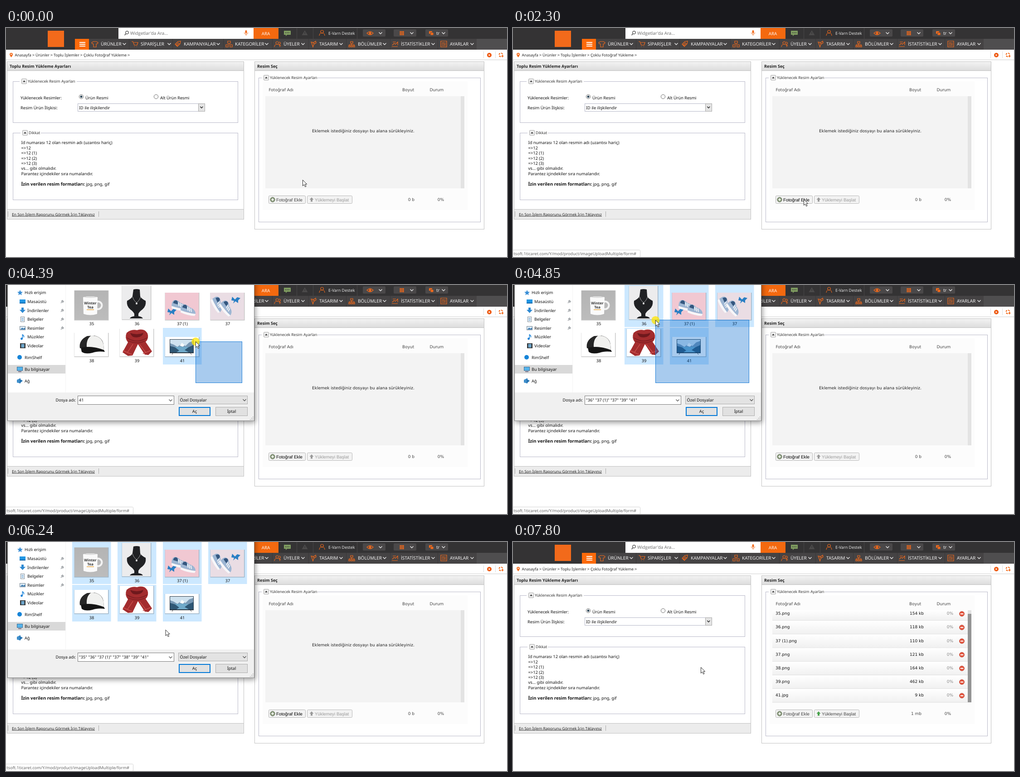
Animation, 1105 px wide and 507 px high, one loop 8.17 s. Source, as an HTML page:

```html
<!DOCTYPE html>
<html lang="tr">
<head>
<meta charset="utf-8">
<title>Çoklu Fotoğraf Yükleme</title>
<style>
html, body { margin: 0; width: 100%; height: 100%; overflow: hidden; background: #fff; }
svg { display: block; }
text { font-family: "Noto Sans", "Open Sans", sans-serif; text-rendering: geometricPrecision; white-space: pre; }
.menu { font-family: "Open Sans", sans-serif; }
.wide { font-family: "DejaVu Sans", sans-serif; }
.button { font-family: "Liberation Sans", sans-serif; }
.bold { font-weight: bold; }
.mid { text-anchor: middle; }
.end { text-anchor: end; }
.icon { fill: none; stroke: #f26a1b; stroke-width: 1.2; }
#dialogFrame { filter: drop-shadow(2px 4px 6px rgba(0,0,0,.4)); }
</style>
</head>
<body>
<svg id="stage" width="1105" height="507" viewBox="0 0 1105 507"></svg>
<script>
const LOOP = 8170;
const ORANGE = '#f26a1b';
const rect = (x, y, w, h, fill, more = '') => `<rect x="${x}" y="${y}" width="${w}" height="${h}" fill="${fill}" ${more}/>`;
const box = (x, y, w, h, fill, stroke, more = '') => rect(x + .5, y + .5, w - 1, h - 1, fill, `stroke="${stroke}" ${more}`);
const circle = (x, y, r, fill, more = '') => `<circle cx="${x}" cy="${y}" r="${r}" fill="${fill}" ${more}/>`;
const path = (d, fill, more = '') => `<path d="${d}" fill="${fill}" ${more}/>`;
const line = (d, stroke, width = 1) => path(d, 'none', `stroke="${stroke}" stroke-width="${width}"`);
const icon = d => `<path class="icon" d="${d}"/>`;
const text = (x, y, s, size = 9.2, fill = '#111', cls = '', more = '') =>
  `<text x="${x}" y="${y}" font-size="${size}" fill="${fill}" class="${cls}" ${more}>${s}</text>`;
const group = (id, body, more = '') => `<g id="${id}" ${more}>${body}</g>`;
const chevron = (x, y, color = '#eee') => line(`M${x - 3.5} ${y - 2}l3.5 3.5 3.5 -3.5`, color, 1.3);
const each = (list, fn) => list.map(fn).join('');

const menu = [
  [209, 261, 'ÜRÜNLER', 'M189 32l4 -2h6l4 2 -1 3h-3v7h-6v-7h-3z'],
  [297, 360, 'SİPARİŞLER', 'M277 30h3l3 8h6l2 -6h-9M283 41h1M288 41h1'],
  [392, 468, 'KAMPANYALAR', 'M373 36l6 -6 6 -1 -1 6 -6 6zM375 36l4 4M377 34l4 4M379 32l4 4'],
  [505, 575, 'KATEGORİLER', 'M489 29h6v5h-6zM485 37h5v5h-5zM494 37h5v5h-5zM492 34v3'],
  [612, 655, 'ÜYELER', 'M592 42c0 -8 12 -8 12 0M598 30a3 3 0 1 0 .1 0M602 31c4 0 4 5 1 5l3 4'],
  [691, 739, 'TASARIM', 'M673 31l6 1 4 -3 1 4 -5 3 -2 6 -2 -6zM676 33l5 2'],
  [776, 835, 'BÖLÜMLER', 'M760 30h5v4h-5zM756 39h3v3h-3zM761 39h3v3h-3zM766 39h3v3h-3zM757 39v-2h11v2M762 34v4'],
  [871, 942, 'İSTATİSTİKLER', 'M851 41h13M852 38l4 -4 3 2 5 -5v7M853 31h7'],
  [979, 1028, 'AYARLAR', 'M959 29h13v13h-13zM961 33h9M961 36h9M961 39h9M964 32v2M968 35v2']
];

function header() {
  return rect(0, 0, 1105, 48, '#343334') + rect(152, 24, 886, 24, '#454344') + rect(1038, 24, 67, 24, '#4f4e4f')
    + rect(92, 6, 36, 36, ORANGE)
    + rect(248, 0, 298, 24, '#fff') + circle(267, 10, 3.2, 'none', 'stroke="#444" stroke-width="1.2"') + line('M264.6 12.5l-3 3.5', '#444', 1.4)
    + text(274, 15, "Widgetlar'da Ara...", 9.8, '#666', 'menu')
    + rect(527.5, 5, 4, 7, ORANGE, 'rx="2"') + line('M525.5 10c0 5 8 5 8 0M529.5 14v3', ORANGE)
    + rect(546, 0, 55, 24, '#f4690f') + text(573, 15.5, 'ARA', 9.8, '#fff', 'menu mid')
    + path('M613 6h15v9h-8l-3 3v-3h-4z', '#7f9c60') + each([617, 620.5, 624], x => circle(x, 10.5, 1, '#343334'))
    + line('M641.5 0v24M677.5 0v24M774.5 0v24', '#484647') + path('M659 5l6.5 11h-13z', '#4b4a4a') + rect(658.5, 9, 1.2, 4, '#343334')
    + icon('M691 17c0 -8 12 -8 12 0M697 5a3.3 3.3 0 1 0 .1 0') + text(711, 15, 'E-Varn Destek', 9, '#f2f2f2', 'menu')
    + each([787, 855, 925], x => rect(x, 3, 50, 16, '#4a4849', 'rx="2"')) + each([826, 895, 965], x => chevron(x, 11.5))
    + icon('M796 11.5q7 -7 14 0q-7 7 -14 0z') + circle(803, 11.5, 2.5, ORANGE)
    + each([0, 1, 2], i => each([0, 1, 2], j => rect(868.5 + 3.3 * i, 7 + 3.2 * j, 2.6, 2.6, ORANGE)))
    + rect(933, 7, 7, 6, ORANGE, 'rx="1"') + rect(936, 10, 7, 6, ORANGE, 'rx="1" stroke="#4a4849"') + text(949, 15, 'tr', 9.8, '#fff', 'menu')
    + rect(152, 24, 31, 24, '#fb6a0a') + each([31, 35, 39], y => rect(162, y, 13, 2, '#fff'))
    + each(menu, ([x, arrow, label, d]) => icon(d) + text(x, 39.3, label, 10.1, '#fff', 'menu') + chevron(arrow, 35.5))
    + each([271, 367, 479, 587, 667, 750, 847, 952], x => rect(x, 24, 1, 24, '#3a3839'));
}

function breadcrumb() {
  return rect(0, 70, 1105, 1, '#cfcfcf')
    + path('M11.5 65c-6 -7 -3 -10 0 -10s6 3 0 10z', ORANGE) + circle(11.5, 58.3, 1.3, '#fff')
    + text(19.5, 62.8, 'Anasayfa &gt; Ürünler &gt; Toplu İşlemler &gt; Çoklu Fotoğraf Yükleme &gt;', 8.5, '#222')
    + line('M1053.5 52v15M1079.5 52v15', '#ddd') + circle(1066, 60, 5, '#ee5a12') + path('M1064.7 57.7v4.6l3.5 -2.3z', '#fff')
    + circle(1091.5, 59.5, 4, 'none', `stroke="${ORANGE}" stroke-width="2.2" stroke-dasharray="4 2.28"`) + line('M1095 60v5M1092.5 62.5h5', ORANGE, 1.4);
}

const panel = (x, w, h, title) => box(x, 74, w, h, '#fff', '#c2c2c2')
  + box(x, 74, w, 21, 'url(#titleShade)', '#c2c2c2') + text(x + 6, 88, title, 9.1, '#222', 'bold');

const fieldset = (x, y, w, h, legendX, legendW, title) => box(x, y, w, h, 'none', '#b9b9c9')
  + rect(legendX - 4, y - 2, legendW, 5, '#fff')
  + box(legendX, y - 6, 12, 12, '#eee', '#aaa', 'rx="1.5"') + path(`M${legendX + 3} ${y + 1.5}l3 -3.5 3 3.5z`, '#333')
  + text(legendX + 14, y + 3.3, title, 8.55, '#333');

const radio = (x, on) => circle(x, 152, 4.7, '#f6f6f6', 'stroke="#777"') + (on ? circle(x, 152, 2.5, '#334b5c') : '');

function settingsPanel() {
  const notes = ['Id numarası 12 olan resmin adı (uzantısı hariç)', '=&gt;12', '=&gt;12 (1)', '=&gt;12 (2)', '=&gt;12 (3)', 'vs... gibi olmalıdır.', 'Parantez içindekiler sıra numalarıdır.'];
  return panel(2, 523, 350, 'Toplu Resim Yükleme Ayarları')
    + fieldset(15, 118, 497, 92, 34, 126, 'Yüklenecek Resim Ayarları') + fieldset(15, 232, 497, 149, 36, 45, 'Dikkat')
    + text(32, 157.5, 'Yüklenecek Resimler:') + text(32, 179.7, 'Resim Ürün İlişkisi:')
    + radio(166, true) + text(175, 157.5, 'Ürün Resmi') + radio(331, false) + text(340, 157.5, 'Alt Ürün Resmi')
    + box(158, 167, 281, 18, '#fff', '#b5b8c8') + text(161, 179.5, 'ID ile ilişkilendir')
    + box(424, 167, 15, 18, '#e4e4e4', '#aaa') + line('M428.3 174l3 3 3 -3', '#333', 1.6)
    + each(notes, (s, i) => text(33.5, 257.3 + 11.4 * i, s, 9.3))
    + text(33.5, 348.5, '<tspan class="bold" font-size="9.8">İzin verilen resim formatları:</tspan> jpg, png, gif', 9.3)
    + box(2, 401, 523, 23, '#ececec', '#c2c2c2') + line('M4.5 406v12M204.5 406v12', '#aaa')
    + text(13, 415.5, 'En Son İşlem Raporunu Görmek İçin Tıklayınız', 8.5, '#222', '', 'text-decoration="underline"');
}

const files = [['35.png', 154], ['36.png', 118], ['37 (1).png', 110], ['37.png', 121], ['38.png', 164], ['39.png', 462], ['41.jpg', 9]];

function uploadPanel() {
  const cell = (x, y, s, cls = '', fill = '#444') => text(x, y, s, 9, fill, 'wide ' + cls);
  const rows = each(files, ([name, kb], i) => {
    const y = 158 + 30.2 * i, top = Math.max(151, y - 14);
    return rect(572, top, 431, y + 16.2 - top, 'url(#rowShade)') + rect(572, y + 15.4, 431, .8, '#d9d9d9')
      + cell(579, y + 3.2, name, '', '#111') + cell(906, y + 3.2, kb + ' kb', 'end', '#111') + cell(971, y + 3.2, '0%', 'end', '#888')
      + circle(990, y + 1, 5.5, '#e2553f', 'stroke="#b9402f" stroke-width=".7"') + rect(986.8, y, 6.4, 2.2, '#fff');
  });
  const arrow = 'M674 375l4.5 5h-2.5v4.5h-4v-4.5h-2.5z';
  return panel(548, 507, 372, 'Resim Seç') + fieldset(557, 110, 490, 320, 568, 124, 'Yüklenecek Resim Ayarları')
    + rect(566, 118, 452, 285, '#fcfcfc')
    + cell(579.5, 140, 'Fotoğraf Adı') + cell(874, 140, 'Boyut') + cell(934.5, 140, 'Durum')
    + rect(572, 151, 431, 204, '#f3f3f3') + rect(1003, 151, 8, 204, '#e3e3e3')
    + box(579, 371, 82, 18, '#f3f3f3', '#b5b5b5', 'rx="2"') + circle(588, 380, 5.2, '#8a9a7c', 'stroke="#697960"') + line('M585 380h6M588 377v6', '#fff', 1.6)
    + text(596, 383.5, 'Fotoğraf Ekle', 9.75, '#444', 'button', 'id="addLabel"')
    + box(664, 371, 100, 18, '#f3f3f3', '#b9b9b9', 'rx="2"')
    + group('emptyList', cell(675, 230.5, 'Eklemek istediğiniz dosyayı bu alana sürükleyiniz.', '', '#222')
      + path(arrow, '#999') + text(681, 383.5, 'Yüklemeyi Başlat', 9.8, '#999', 'button') + cell(901, 383.2, '0 b', 'end'))
    + group('fullList', rows + rect(1003, 159, 8, 196, '#959595')
      + path(arrow, '#46a049') + text(681, 383.5, 'Yüklemeyi Başlat', 9.8, '#444', 'button') + cell(901, 383.2, '1 mb', 'end'))
    + cell(966, 383.2, '0%', 'end');
}

const shoe = (x, y, turn) => `<g transform="translate(${x} ${y}) rotate(${turn})">`
  + path('M-17 6q-3 -15 7 -16q6 1 10 4q15 1 17 12z', '#9db6d3') + path('M-17 5q17 3 34 0l-1 5q-16 3 -32 0z', '#f7f7f9')
  + path('M-15 -2q0 -8 7 -7q4 3 3 8z', '#35577f') + line('M-4 -6l3 8M0 -5l3 8M4 -4l3 7', '#f8f8fa', 1.8) + '</g>';
const bow = (x, y) => path(`M${x} ${y}l-6 -6 -2 8 6 1 -2 6 5 -5 6 4 0 -6 5 -5 -7 -2z`, '#2a7fc4');

const items = [
  ['35', 151, 12, 74, 65, rect(151, 12, 74, 65, 'url(#greyShade)') + circle(203, 45, 8.5, 'none', 'stroke="#f3f3f3" stroke-width="4"')
    + path('M170 27q16 -4 32 0l-1 37q-15 5 -30 0z', '#fafafa') + path('M170 27q16 -4 32 0q-16 3 -32 0z', '#ddd')
    + text(186, 43, 'Winter', 8, '#333', 'mid bold') + text(186, 51.5, 'Tea', 8, '#333', 'mid bold') + rect(178, 54, 16, 1.3, '#e6a030')],
  ['36', 256, 2, 63, 74, rect(256, 2, 63, 74, '#ececed')
    + path('M281 10q7 -2 14 0l1 15q2 5 12 10q2 11 -7 19q-7 5 -9 10v5q8 1 10 5h-29q2 -4 10 -5v-5q-2 -5 -9 -10q-9 -8 -7 -19q10 -5 12 -10z', '#202124')
    + line('M279 26q3 9 9 13q6 -4 9 -13', '#aaa') + circle(288, 41, 2, '#e8e8e8')],
  ['37 (1)', 351, 17, 74, 60, rect(351, 17, 74, 60, '#f1c8d2') + shoe(383, 45, 12) + shoe(403, 55, 14) + bow(364, 58)],
  ['37', 451, 17, 74, 60, rect(451, 17, 74, 60, '#eadde4') + shoe(468, 43, 60) + shoe(488, 51, 50) + bow(505, 32)],
  ['38', 151, 106, 74, 52, rect(151, 106, 74, 52, '#fff')
    + path('M163 140q-3 -18 16 -27l16 -1q18 4 20 20l1 12q-26 -7 -53 -4z', '#262626')
    + path('M178 137q-1 -18 10 -25q23 0 27 20l1 12q-16 -6 -38 -7z', '#f1f1ef') + path('M165 139q24 -6 51 5l2 4q-16 -2 -27 2q-16 4 -24 -2z', '#151515')],
  ['39', 251, 97, 74, 61, rect(251, 97, 74, 61, '#fff')
    + path('M266 106q10 -9 23 -6q16 -5 23 7q4 11 -4 19l14 21 -8 8 -8 -1 -15 -23 -12 25 -10 1 -12 -8 12 -22q-8 -10 -3 -21z', '#a32c2e')
    + path('M274 106q14 6 29 0q-2 9 -14 10t-15 -10z', '#6f191d') + line('M267 117q21 14 44 0M270 124q20 8 36 0', '#7d1e22', 1.6)
    + line('M258 145l20 9M302 152l17 -7M280 131l-12 18M294 131l14 18', '#c94d4a', 1.4)],
  ['41', 351, 115, 74, 43, rect(351, 115, 74, 43, '#fff') + rect(361, 120, 53, 31, '#2b3946') + rect(362, 121, 51, 28, '#cfe2ef')
    + path('M362 129l8 3 8 5 9 -7 9 5 8 -8 9 -3v15h-51z', '#7898b4') + path('M383 134l5 -6 6 5 -4 4z', '#f7fafb')
    + path('M362 138q26 -3 51 0v11h-51z', '#6fa9c9') + path('M362 135l11 3 9 7 -6 4h-14zM413 133l-11 5 -8 6 9 5h10z', '#2f5775')
    + line('M368 151l-2 3M407 151l2 3', '#333')]
].map(([name, x, y, w, h, art], i) => ({ name, x, y, w, h, art, cellX: 146 + 100 * (i % 4), cellY: i < 4 ? -4 : 95, cellH: i < 4 ? 97 : 81 }));

const places = [
  [41, 17, 'Hızlı erişim', path('M31 11l1.8 4 4.2 .4 -3.2 2.8 1 4.3 -3.8 -2.3 -3.8 2.3 1 -4.3 -3.2 -2.8 4.2 -.4z', '#3b8fd6')],
  [47, 37, 'Masaüstü', rect(30, 32, 13, 9, '#2196e3') + rect(30, 39, 13, 2, '#0a67ad')],
  [47, 56.5, 'İndirilenler', path('M34 50h5v5h4l-6.5 7 -6.5 -7h4z', '#2f8ad2')],
  [47, 76, 'Belgeler', box(32, 70, 9, 12, '#fff', '#7c8a96') + line('M34 73.5h5M34 76h5M34 78.5h5', '#4b8fc7')],
  [47, 95.5, 'Resimler', box(30, 91, 13, 9, '#dcebf6', '#7c8a96') + path('M31.5 98.5l4 -4 3 2 3.5 -2v4z', '#3b79ad')],
  [47, 115, 'Müzikler', circle(34.5, 119, 2.4, '#1681d8') + line('M36.3 119v-9q4 2 3 6', '#1681d8', 1.5)],
  [47, 134.5, 'Videolar', rect(31, 129, 12, 11, '#333') + rect(33.5, 130.5, 7, 8, '#6da5cb')],
  [41, 160.5, 'RimShelf', circle(30, 160, 5, '#1684d8')],
  [41, 186.5, 'Bu bilgisayar', box(24, 181, 13, 9, '#56b4ec', '#3c6e93') + rect(27, 191, 7, 1.5, '#557')],
  [41, 212.5, 'Ağ', path('M24 210l8 -4v12l-8 -2z', '#3f8fcb') + path('M30 208l7 4 -7 6z', '#2674b3')]
];

function dialog() {
  const pin = y => line(`M121 ${y + 3}l3 -3M122 ${y - 2}l4 4M124 ${y - 3.5}l3.5 3.5M123 ${y - 1.5}l2 -1.5M125 ${y + 1}l2 -1`, '#8a8f94', 1.1);
  return group('dialogFrame', box(3, -20, 545, 321, '#fff', '#8a8a8a')) + rect(4, 238, 543, 62, '#f0f0f0')
    + rect(131, 0, 1, 238, '#f3f3f3') + rect(4, 177, 127, 19, '#d9d9d9')
    + each(places, ([x, y, label, art]) => art + text(x, y + 3.3, label)) + each([37, 56.5, 76, 95.5], pin)
    + each(items, o => `<rect class="cell" x="${o.cellX}" y="${o.cellY}" width="85.5" height="${o.cellH}"/>`
      + rect(o.x - .5, o.y, o.w + 2, o.h + 1.5, '#000', 'opacity=".22"') + o.art
      + text(o.cellX + 43, o.cellY < 0 ? 88.5 : 171.3, o.name, 9.2, '#111', 'mid'))
    + text(154, 258.3, 'Dosya adı:', 9.2, '#111', 'end') + box(158, 245, 213, 20, '#fff', '#7a7a7a', 'id="field"') + chevron(363, 255.5, '#555')
    + rect(160, 248, 158, 14, '#0078d7', 'id="textSelection"') + rect(161, 249, 1, 12, '#000', 'id="caret"') + text(161, 258.3, '', 9.2, '#111', '', 'id="fileName"')
    + box(380, 245, 153, 19, '#e3e3e3', '#adadad', 'id="combo"') + text(383.5, 258, 'Özel Dosyalar') + chevron(526, 255, '#555')
    + rect(382, 271, 68, 18, '#e1e1e1', 'id="openButton" stroke="#0078d7" stroke-width="2"') + text(416, 283, 'Aç', 9.2, '#111', 'mid')
    + box(462, 270, 71, 20, '#e1e1e1', '#adadad') + text(497.5, 283, 'İptal', 9.2, '#111', 'mid')
    + each([[544, 292], [544, 295], [541, 295], [544, 298], [541, 298], [538, 298]], ([x, y]) => rect(x, y - 1, 1.5, 1.5, '#aaa'))
    + box(0, 0, 1, 1, 'rgba(0,102,204,.34)', '#1f7fd8', 'id="marquee"');
}

const shade = (id, from, to) => `<linearGradient id="${id}" x2="0" y2="1"><stop stop-color="${from}"/><stop offset="1" stop-color="${to}"/></linearGradient>`;
document.getElementById('stage').innerHTML =
  `<defs>${shade('titleShade', '#f3f3f3', '#dcdcdc')}${shade('rowShade', '#fff', '#f0f0f0')}${shade('greyShade', '#b4b4b4', '#bcbcbc')}</defs>`
  + header() + breadcrumb() + settingsPanel() + uploadPanel()
  + group('status', box(-1, 491, 282, 17, '#fff', '#d5d5d5', 'rx="2"') + text(1.5, 503, 'tsoft.1ticaret.com/Y/mod/product/imageUploadMultiple/form#', 9.15, '#666'))
  + group('dialog', dialog())
  + group('pointer', circle(.5, .5, 9, '#ffe500', 'id="press" opacity=".75"')
    + path('M.5 .5v13l3 -2.8 2.3 4.9 2.2 -1 -2.3 -4.8h4z', '#fff', 'stroke="#111" stroke-width=".9"'));

const $ = id => document.getElementById(id);
const cells = document.querySelectorAll('.cell');
const show = (id, on) => $(id).setAttribute('visibility', on ? 'inherit' : 'hidden');
const set = (id, attrs) => Object.entries(attrs).forEach(([k, v]) => $(id).setAttribute(k, v));
const ramp = (t, from, to) => Math.min(1, Math.max(0, (t - from) / (to - from)));

// time, x, y of the pointer tip
const track = [
  [400, 654, 336], [720, 680, 326], [900, 697, 340], [1210, 680, 372], [1310, 680, 372], [1840, 649, 383], [2000, 641, 379],
  [2930, 641, 379], [3220, 595, 302], [3770, 522, 221], [3850, 521, 217], [4390, 418, 125], [4620, 362, 94],
  [5330, 214, 43], [5770, 214, 43], [6400, 398, 245], [6640, 414, 277]
];
function pointerAt(t) {
  const next = track.findIndex(k => k[0] > t);
  if (next < 0) return track.at(-1).slice(1);
  if (next === 0) return track[0].slice(1);
  const [t0, x0, y0] = track[next - 1], [t1, x1, y1] = track[next], p = ramp(t, t0, t1);
  return [x0 + (x1 - x0) * p, y0 + (y1 - y0) * p];
}

const DRAG = { start: 3850, settle: 5330, end: 5620, x: 521, y: 217 };
const CONFIRM = 7020, LISTED = 7420;
const during = (t, from, to) => t >= from && t < to;

function render(t) {
  const [x, y] = pointerAt(t);
  $('pointer').setAttribute('transform', `translate(${x} ${y})`);
  show('press', during(t, 2000, 2150) || during(t, DRAG.start, DRAG.end) || during(t, 6800, CONFIRM));

  const hovered = during(t, 1620, 7500);
  set('addLabel', { fill: hovered ? '#000' : '#444' });
  show('status', hovered);
  show('emptyList', t < LISTED);
  show('fullList', t >= LISTED);

  $('dialog').setAttribute('opacity', ramp(t, 2480, 2760) * (1 - ramp(t, 7250, 7420)));
  show('dialog', during(t, 2480, 7420));

  const [dragX, dragY] = pointerAt(Math.min(t, DRAG.settle));
  const confirmed = t >= CONFIRM;
  const picked = items.filter((o, i) => {
    const on = t >= DRAG.start && dragX < o.cellX + 85.5 && dragY < o.cellY + o.cellH;
    cells[i].setAttribute('fill', on ? (confirmed ? '#d9d9d9' : '#cce8ff') : 'none');
    return on;
  }).map(o => o.name);
  $('fileName').textContent = picked.length > 1 ? picked.map(n => `"${n}"`).join(' ') : picked.join('');
  set('fileName', { fill: confirmed ? '#fff' : '#111' });
  show('textSelection', confirmed);

  show('marquee', during(t, DRAG.start, DRAG.end));
  set('marquee', { x: Math.round(dragX) + .5, y: Math.round(dragY) + .5, width: DRAG.x - Math.round(dragX) - 1, height: DRAG.y - Math.round(dragY) - 1 });

  const focused = t < DRAG.start;
  set('field', { stroke: focused ? '#0078d7' : '#7a7a7a' });
  show('caret', focused && Math.floor((t - 2760) / 530) % 2 === 0);
  const overCombo = x >= 380 && during(y, 245, 264);
  set('combo', { fill: overCombo ? '#e5f1fb' : '#e3e3e3', stroke: overCombo ? '#0078d7' : '#adadad' });
  const overOpen = t > 5800 && y >= 270;
  set('openButton', {
    fill: confirmed ? '#cce4f7' : overOpen ? '#e5f1fb' : '#e1e1e1',
    stroke: confirmed ? '#005499' : '#0078d7', 'stroke-width': confirmed ? 1.3 : 2
  });
}

function tick() {
  render(performance.now() % LOOP);
  requestAnimationFrame(tick);
}
tick();
</script>
</body>
</html>
```
